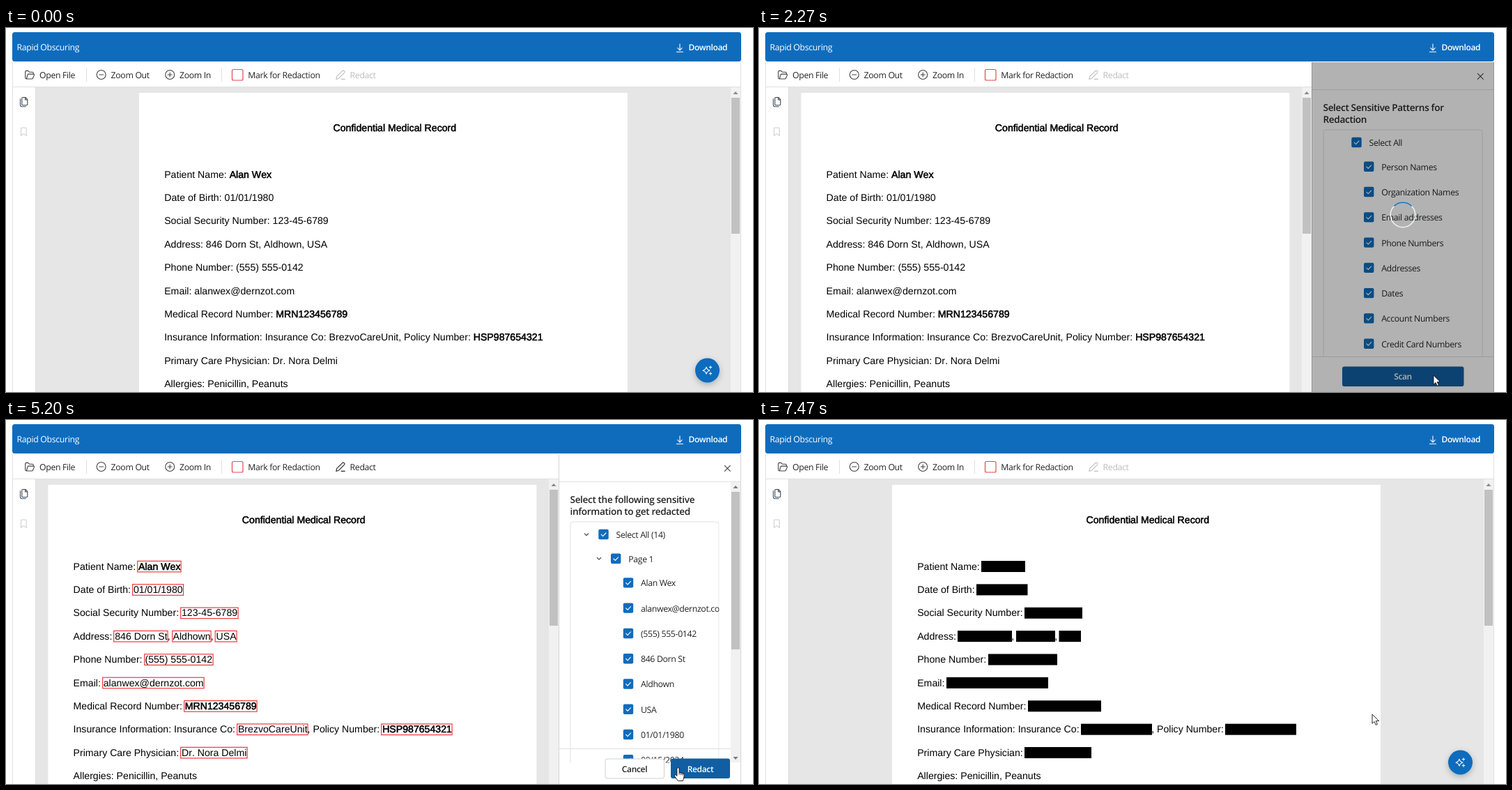
An HTML page for the animation above (8000 ms loop, 1072x522 px).

```html
<!DOCTYPE html>
<html lang="en">
<head>
<meta charset="utf-8">
<title>Document redaction</title>
<style>
  html, body { margin: 0; width: 100%; height: 100%; overflow: hidden; background: #fff; }
  svg { display: block; width: 100%; height: 100%; }
  text { white-space: pre; text-rendering: geometricPrecision; }
  .ui { font: 12.3px "Open Sans", "Noto Sans", sans-serif; letter-spacing: -.028em; fill: #242424; }
  .ui .semi { font-size: 12px; font-weight: 600; }
  .ui .head { font-size: 13.6px; font-weight: 600; }
  .paper { font: 14.14px "Liberation Sans", Arial, sans-serif; font-kerning: none; fill: #000; }
  .strong { stroke: #000; stroke-width: .55px; }
  .line { fill: none; stroke: #424242; stroke-width: 1.1; stroke-linecap: round; stroke-linejoin: round; }
  .rule { fill: none; stroke: #e0e0e0; }
  .ui .on-blue { fill: #fff; }
</style>
</head>
<body>
<svg viewBox="0 0 1072 522" xmlns="http://www.w3.org/2000/svg">
  <defs>
    <clipPath id="frameClip"><rect x="793" y="49" width="262" height="473"/></clipPath>
    <clipPath id="listClip"><rect x="794" y="89" width="229.5" height="402.5"/></clipPath>
    <filter id="shadow" x="-50%" y="-50%" width="200%" height="200%">
      <feDropShadow dx="0" dy="3" stdDeviation="4" flood-color="#000" flood-opacity=".25"/>
    </filter>
  </defs>
  <rect width="1072" height="522" fill="#fff"/>

  <!-- viewer -->
  <rect x="43" y="85" width="997" height="437" fill="#e6e6e6"/>
  <g id="page">
    <rect id="sheet" x="191.5" y="93.5" width="700" height="440"/>
    <g id="content" class="paper">
      <g id="lines"></g>
      <g id="marks" fill="none" stroke="#f0282d" stroke-width="1.1"></g>
      <g id="bars" fill="#000"></g>
    </g>
  </g>
  <g id="scroll">
    <rect x="1040" y="85" width="14" height="437" fill="#f1f1f1"/>
    <path d="M1043.5 95l3.5-4 3.5 4z" fill="#8a8a8a"/>
    <rect x="1041" y="100" width="12" height="195" fill="#c1c1c1"/>
  </g>
  <g id="viewSpin"></g>

  <!-- side strip -->
  <path class="rule" d="M9.5 48V522M42.5 85V522M1054.5 48V522M9 84.5H1055"/>
  <g id="pagesIcon" class="line">
    <path d="M24 99.5h3.8l3 3.2v6.8q0 1.2-1.2 1.2h-5.6q-1.2 0-1.2-1.2v-8.8q0-1.2 1.2-1.2zM27.6 99.8v3.2h3.2"/>
    <path d="M20.5 101.8v8.4q0 2.6 2.6 2.6h5.2" stroke="#34587c"/>
  </g>
  <path class="line" style="stroke:#d0d0d0" d="M22.6 143h5.6q1 0 1 1v10.4l-3.8-2.8-3.8 2.8V144q0-1 1-1z"/>

  <!-- header and toolbar -->
  <rect x="9" y="6" width="1046" height="42" rx="3.5" fill="#0f6cbd"/>
  <g class="ui">
    <text class="on-blue" x="15.6" y="32">Rapid Obscuring</text>
    <text class="semi on-blue" x="979.5" y="32.3">Download</text>
    <path class="line" style="stroke:#fff" d="M967 23v8.5M963.8 28.6l3.2 3.2 3.2-3.2M962.5 34.2h9"/>

    <path class="line" d="M29.5 73q-1.8 0-1.8-1.8V63q0-1.6 1.6-1.6h2.4l1.8 1.8h4.2q1.6 0 1.6 1.6v1M29.5 73h7.6q1 0 1.4-1l2-4.6q.5-1.3-.8-1.3h-7.4q-1 0-1.4 1z"/>
    <text x="48" y="72">Open File</text>
    <path class="rule" d="M115.5 57V77M309.5 57V77"/>
    <g class="line">
      <circle cx="136.7" cy="67" r="6.5"/><path d="M133.7 67h6"/>
      <circle cx="235.2" cy="67" r="6.5"/><path d="M232.2 67h6M235.2 64v6"/>
    </g>
    <text x="150.6" y="72">Zoom Out</text>
    <text x="249" y="72">Zoom In</text>
    <rect x="324.5" y="59.5" width="15.5" height="15.5" rx="2" fill="#fff" stroke="#e8484f" stroke-width="1.2"/>
    <text x="347.3" y="72">Mark for Redaction</text>
    <g id="redactTool">
      <path class="line" style="stroke:currentColor" d="M473.8 73.4l1-4 7.9-7.7q1.3-1.2 2.6 0t0 2.6l-7.7 7.9zM481.2 73.4h5"/>
      <text x="493.6" y="72" style="fill:currentColor">Redact</text>
    </g>
  </g>

  <!-- assistant button -->
  <g id="fab">
    <circle id="fabDisc" cx="1006.5" cy="491" r="17.5" filter="url(#shadow)"/>
    <path class="line" style="stroke:#fff" d="M1005 486.2q.9 4 5 5-4.1 1-5 5-.9-4-5-5 4.1-1 5-5zM1011 484.8v3.4M1009.3 486.5h3.4M1011 493.8v3.4M1009.3 495.5h3.4"/>
  </g>

  <!-- side panel -->
  <g clip-path="url(#frameClip)"><g id="panel" class="ui">
    <rect x="793.5" y="48.5" width="261" height="480" fill="#fff" stroke="#d6d6d6"/>
    <path class="line" d="M1031.3 65.3l8 8M1039.3 65.3l-8 8"/>
    <path class="rule" d="M794 88.5H1054M794 471.5H1054"/>
    <g id="patterns">
      <text class="head" x="809.5" y="118.6">Select Sensitive Patterns for</text>
      <text class="head" x="809.5" y="135.6">Redaction</text>
      <path class="rule" d="M810 471V149.5q0-3.5 3.5-3.5h221q3.5 0 3.5 3.5V471"/>
      <g id="patternList"></g>
      <rect id="scanButton" x="837" y="485.5" width="174.5" height="28.5" rx="3"/>
      <text class="semi on-blue" x="924" y="504" text-anchor="middle">Scan</text>
    </g>
    <g id="results">
      <text class="head" x="809.5" y="118.6">Select the following sensitive</text>
      <text class="head" x="809.5" y="135.6">information to get redacted</text>
      <g clip-path="url(#listClip)">
        <path class="rule" d="M810 492V149.5q0-3.5 3.5-3.5h206q3.5 0 3.5 3.5V492"/>
        <path class="line" d="M830.3 163l2.7 2.7 2.7-2.7M848.3 197.5l2.7 2.7 2.7-2.7"/>
        <g id="resultList"></g>
      </g>
      <rect x="1040" y="89" width="14" height="402" fill="#f1f1f1"/>
      <path d="M1043.5 98l3.5-4 3.5 4zM1043.5 483l3.5 4 3.5-4z" fill="#777"/>
      <rect x="1041" y="103" width="12" height="226" fill="#c1c1c1"/>
      <rect x="860" y="486" width="84.5" height="28" rx="3" fill="#fff" stroke="#d1d1d1"/>
      <text class="semi" x="902" y="504.5" text-anchor="middle">Cancel</text>
      <rect id="redactButton" x="954" y="485.5" width="85" height="28.5" rx="3"/>
      <text class="semi on-blue" x="996.5" y="504.5" text-anchor="middle">Redact</text>
    </g>
    <g id="panelSpin">
      <rect x="793" y="49" width="262" height="473" fill="#000" opacity=".3"/>
    </g>
  </g></g>

  <!-- pointer -->
  <g id="pointer" stroke="#111" stroke-width=".9" stroke-linejoin="round" fill="#fff">
    <path id="arrow" d="M0 0V13.3L3.1 10.5 5.2 15.3 7.4 14.3 5.3 9.6H9.6Z"/>
    <g id="hand">
      <path d="M-1.6 10.5V1.2a1.6 1.6 0 0 1 3.2 0V6.5l5 1q2.4.6 2.2 3l-.8 4.5-1.2 3.5H-.2L-4.8 12q-.9-1.6.4-2.2 1-.3 2.8 1.7z"/>
      <path d="M1.7 6.5v3.2M4.2 7.2v3M6.6 7.8v2.8" fill="none"/>
    </g>
  </g>
</svg>
<script>
const LOOP = 8000, STEP = 200 / 3;
const BLUE = '#0f6cbd', HOVER = '#115ea3', PRESSED = '#0f548c';
const $ = id => document.getElementById(id);

function add(parent, tag, attrs, text) {
  const node = document.createElementNS('http://www.w3.org/2000/svg', tag);
  for (const key in attrs) node.setAttribute(key, attrs[key]);
  if (text) node.textContent = text;
  return parent.appendChild(node);
}
const show = (id, on) => $(id).setAttribute('display', on ? 'inline' : 'none');
const fill = (id, color) => $(id).setAttribute('fill', color);
const move = (id, x, y = 0) => $(id).setAttribute('transform', `translate(${x} ${y})`);

// Document text; the part after "|" is emphasised.
const ROW = 33.38;
const LINES = [
  'Patient Name: |Alan Wex',
  'Date of Birth: 01/01/1980',
  'Social Security Number: 123-45-6789',
  'Address: 846 Dorn St, Aldhown, USA',
  'Phone Number: (555) 555-0142',
  'Email: alanwex@dernzot.com',
  'Medical Record Number: |MRN123456789',
  'Insurance Information: Insurance Co: BrezvoCareUnit, Policy Number: |HSP987654321',
  'Primary Care Physician: Dr. Nora Delmi',
  'Allergies: Penicillin, Peanuts'
];
add($('lines'), 'text', { x: 557.8, y: 147.6, 'text-anchor': 'middle', class: 'strong' }, 'Confidential Medical Record');
LINES.forEach((line, i) => {
  const [plain, strong] = line.split('|');
  const text = add($('lines'), 'text', { x: 227.2, y: 214.6 + i * ROW });
  add(text, 'tspan', {}, plain);
  if (strong) add(text, 'tspan', { class: 'strong' }, strong);
});

// Sensitive spans: row, left, width
const SPANS = [
  [0, 319, 63], [1, 312, 73.5], [2, 381, 83], [3, 285, 78], [3, 369, 56], [3, 430.5, 31.5],
  [4, 329, 99], [5, 269, 146], [6, 386, 105], [7, 462, 102], [7, 669, 102], [8, 381, 96]
];
for (const [row, x, width] of SPANS) {
  const y = 202 + row * ROW;
  add($('marks'), 'rect', { x: x + .3, y: y + .3, width: width - .6, height: 15.6 });
  add($('bars'), 'rect', { x, y, width, height: 16 });
}

function checkItem(list, x, y, label) {
  add(list, 'rect', { x: x - 7.2, y: y - 7.2, width: 14.4, height: 14.4, rx: 2, fill: BLUE });
  add(list, 'path', { d: `M${x - 3.3} ${y + .2}l2.4 2.4 4.3-4.6`, class: 'line', style: 'stroke:#fff' });
  add(list, 'text', { x: x + 18, y: y + 5 }, label);
}
const PITCH = 36.27;
checkItem($('patternList'), 857.5, 164, 'Select All');
['Person Names', 'Organization Names', 'Email addresses', 'Phone Numbers', 'Addresses', 'Dates',
  'Account Numbers', 'Credit Card Numbers']
  .forEach((label, i) => checkItem($('patternList'), 875.2, 198.8 + i * PITCH, label));

checkItem($('resultList'), 857.5, 164, 'Select All (14)');
checkItem($('resultList'), 875.2, 198.8, 'Page 1');
['Alan Wex', 'alanwex@dernzot.com', '(555) 555-0142', '846 Dorn St', 'Aldhown', 'USA', '01/01/1980', '09/15/2024']
  .forEach((label, i) => checkItem($('resultList'), 893, 233.4 + i * PITCH, label));

function makeSpinner(id, x, y, r, weight) {
  const k = r * Math.SQRT1_2;
  const base = { fill: 'none', 'stroke-width': weight };
  add($(id), 'circle', { ...base, cx: x, cy: y, r, stroke: '#f0f4f4' });
  const arc = add($(id), 'path', { ...base, d: `M${x - k} ${y - k}A${r} ${r} 0 0 1 ${x + k} ${y - k}`, stroke: BLUE });
  return angle => arc.setAttribute('transform', `rotate(${angle} ${x} ${y})`);
}
const turnPanel = makeSpinner('panelSpin', 924, 268, 17.8, 1.5);
const turnView = makeSpinner('viewSpin', 541.5, 321, 21.5, 2);

const bezier = (a, b, u) => 3 * (1 - u) ** 2 * u * a + 3 * (1 - u) * u * u * b + u ** 3;
function spinAngle(elapsed) {
  const phase = Math.max(0, elapsed) % 1300 / 1300;
  let lo = 0, hi = 1;
  for (let i = 0; i < 20; i++) {
    const mid = (lo + hi) / 2;
    if (bezier(.53, .29, mid) < phase) lo = mid; else hi = mid;
  }
  return 360 * bezier(.21, .67, lo);
}

// Pointer moves: start, end, from x, y, to x, y; a lone start hides it.
const MOVES = [
  [0],
  [130, 533, 1066, 516, 1010.5, 495],
  [1467, 1733, 1010.5, 495, 968, 498],
  [3060],
  [4530, 4600, 426, 512, 817, 510],
  [4660],
  [4930, 5200, 941, 519, 964.5, 499],
  [5200, 5400, 964.5, 499, 969, 496],
  [7267, 7467, 969, 496, 880, 422]
];
function drawPointer(t) {
  const [start, end, x0, y0, x1, y1] = MOVES.filter(m => m[0] <= t).pop();
  show('pointer', end);
  if (!end) return;
  const p = Math.min(1, (t - start) / (end - start));
  const s = p * p * (3 - 2 * p);
  move('pointer', x0 + (x1 - x0) * s, y0 + (y1 - y0) * s);
  const hand = t > 390 && t < 2195 || t > 5060 && t < 5925;
  show('hand', hand);
  show('arrow', !hand);
}

function draw(time) {
  // The screen refreshes fifteen times a second.
  const t = Math.floor((time + 4) / STEP) * STEP + 1;
  const within = (a, b) => t >= a && t < b;

  const narrow = within(1060, 5995);
  move('page', narrow ? -130.6 : 0);
  move('scroll', narrow ? -261 : 0);

  const blank = within(6460, 6660);
  fill('sheet', blank ? '#e6e6e6' : '#fff');
  $('sheet').setAttribute('stroke', blank ? '#bcbcbc' : '#fff');
  show('content', !blank);
  show('marks', within(3860, 6460));
  show('bars', t >= 6660);
  $('pagesIcon').setAttribute('opacity', blank ? .5 : 1);
  $('redactTool').style.color = within(3925, 5925) ? '#242424' : '#bdbdbd';

  show('viewSpin', within(5995, 6660));
  turnView(spinAngle(t - (t < 6460 ? 6000 : 6530)));

  show('fab', t < 995 || t >= 6725);
  fill('fabDisc', within(725, 995) ? PRESSED : within(390, 725) ? HOVER : BLUE);

  const found = t >= 4130;
  show('panel', within(925, 5995));
  move('panel', t < 995 ? 70 : t >= 5925 ? 130 : 0);
  show('patterns', !found);
  show('results', found);
  fill('scanButton', within(1995, 2195) ? PRESSED : t > 1590 ? HOVER : BLUE);
  fill('redactButton', within(5595, 5925) ? PRESSED : t > 5060 ? HOVER : BLUE);
  show('panelSpin', within(2195, 4130));
  turnPanel(spinAngle(t - 2267));

  drawPointer(t);
}

const begin = performance.now();
function tick() {
  draw((performance.now() - begin) % LOOP);
  requestAnimationFrame(tick);
}
tick();
</script>
</body>
</html>
```
